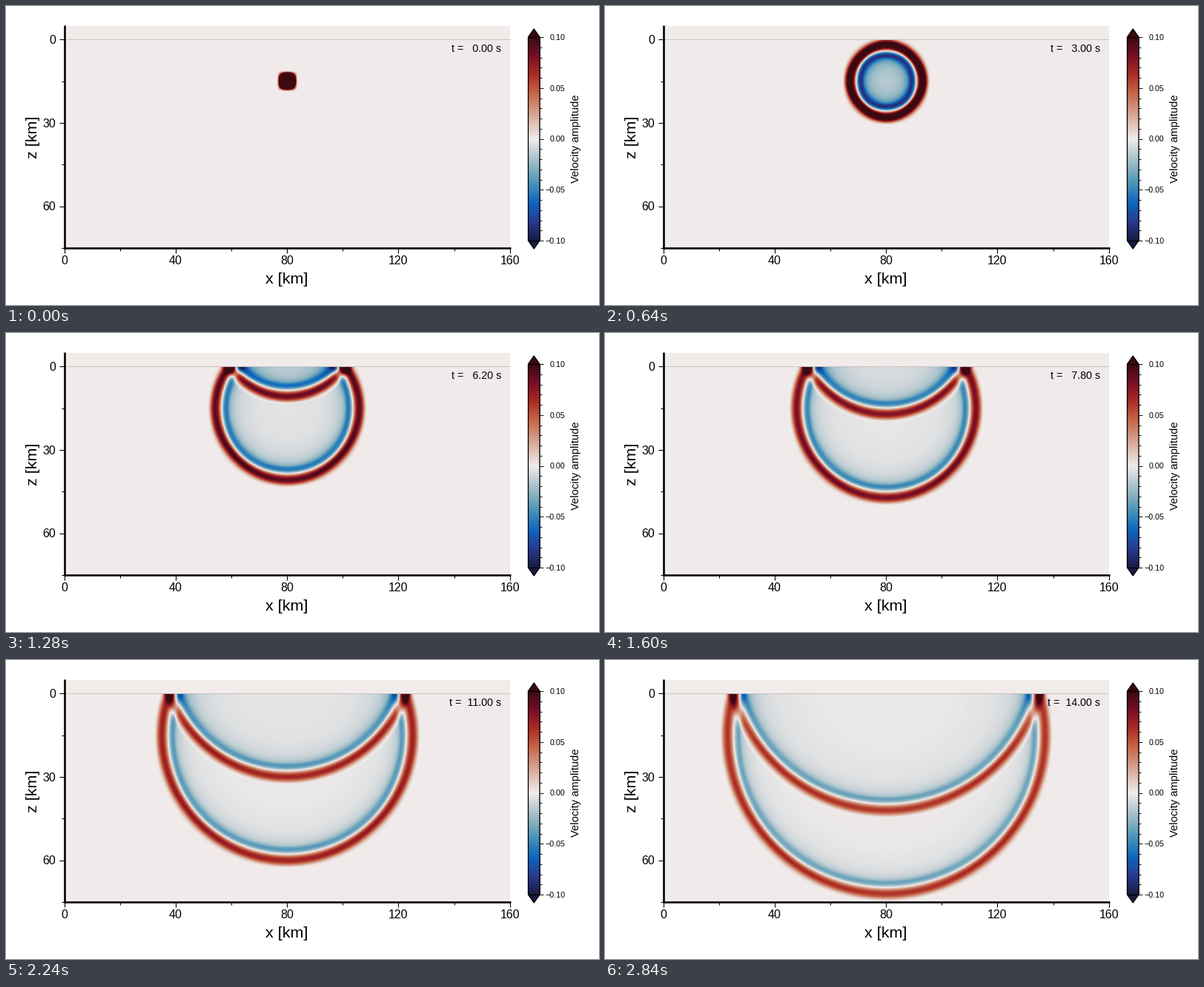
These frames come from a looping animation (800 px wide and 404 px high, 2.88 s). A matplotlib script:

```python
import numpy as np
import matplotlib.pyplot as plt
from matplotlib.animation import FuncAnimation
from matplotlib.colors import LinearSegmentedColormap

W, H, DPI = 800, 404, 100
FRAMES, INTERVAL = 72, 40
plt.rcParams["font.family"] = "Liberation Sans"

# Diverging blue-white-red scale
stops = [(23, 28, 66), (41, 58, 143), (11, 102, 189), (69, 144, 185),
         (142, 181, 194), (210, 216, 219), (241, 236, 235),
         (230, 210, 204), (213, 157, 137), (196, 101, 72),
         (172, 43, 36), (120, 14, 40), (60, 9, 17)]
places = [k / 11 for k in range(6)] + [0.5] + [k / 11 for k in range(6, 12)]
cmap = LinearSegmentedColormap.from_list(
    "wave", [(p, np.array(c) / 255) for p, c in zip(places, stops)], N=512)
VMAX = 0.1

# Map from km to stage pixels
X0, Z0, KM = 78.7, 45.4, 3.756
LEFT, RIGHT = X0, X0 + 160 * KM
TOP, BOTTOM = Z0 - 5 * KM, Z0 + 75 * KM

# Wave field: the free surface is a mirror at z = 0
SPEED, RADIUS, DEPTH = 4.0, 3.8, 15.0
SIZE, STEP = 160.0, 0.25
N = int(SIZE / STEP)
axis = (np.arange(N) + 0.5) * STEP - SIZE / 2


def bump(d):
    return np.where(abs(d) < RADIUS, 0.5 + 0.5 * np.cos(np.pi * d / RADIUS), 0)


start = np.outer(bump(axis - DEPTH) + bump(axis + DEPTH), bump(axis))
spectrum = np.fft.rfft2(start)
kz = 2 * np.pi * np.fft.fftfreq(N, STEP)[:, None]
kx = 2 * np.pi * np.fft.rfftfreq(N, STEP)[None, :]
omega = SPEED * np.hypot(kx, kz)
rows = slice(N // 2, N // 2 + int(75 / STEP))


def field(t):
    return np.fft.irfft2(spectrum * np.cos(omega * t), s=(N, N))[rows]


fig = plt.figure(figsize=(W / DPI, H / DPI), dpi=DPI, facecolor="white")
ax = fig.add_axes([0, 0, 1, 1])
ax.axis("off")


def px(size):
    return size * 72 / DPI


def line(xs, ys, width, color="black", z=4, **kw):
    ax.plot(xs, ys, color=color, lw=px(width), zorder=z,
            solid_capstyle="butt", **kw)


def label(x, y, s, size, ha="center", **kw):
    """Text whose digits are centred on y."""
    return ax.text(x, y + 0.355 * size, s, fontsize=px(size), ha=ha,
                   va="baseline", zorder=5, **kw)


# Plot area
ax.fill([LEFT, RIGHT, RIGHT, LEFT], [TOP, TOP, BOTTOM, BOTTOM],
        color=cmap(0.5), lw=0, zorder=1)
wave = ax.imshow(field(0), cmap=cmap, vmin=-VMAX, vmax=VMAX, zorder=2,
                 extent=[LEFT, RIGHT, BOTTOM, Z0], interpolation="bilinear",
                 aspect="auto")
line([LEFT, RIGHT], [Z0, Z0], 0.9, "#c4c0c0", 3)
line([LEFT, LEFT], [TOP - 1, BOTTOM + 1.2], 2.6)
line([LEFT - 1.2, RIGHT + 1], [BOTTOM, BOTTOM], 2.6)

for km in range(0, 161, 20):
    x, major = X0 + km * KM, km % 40 == 0
    line([x, x], [BOTTOM, BOTTOM + (6.5 if major else 3.5)], 1.1)
    if major:
        label(x, 343.8, str(km), 16)
for km in range(0, 76, 15):
    y, major = Z0 + km * KM, km % 30 == 0
    line([LEFT - (6.5 if major else 3.5), LEFT], [y, y], 1.1)
    if major:
        label(67.5, y, str(km), 16, "right")

label(379, 367, "x [km]", 21.5)
ax.text(42, 177, "z [km]", fontsize=px(21.5), rotation=90, ha="right",
        va="center", rotation_mode="default").set(
            rotation_mode="anchor", ha="center", va="baseline")
clock = label(668, 56.6, "", 14.2, "right")

# Colour bar
BL, BR, BT, BB, TIP = 704.5, 720, 42, 317, 11
mid = (BL + BR) / 2
ax.imshow(np.linspace(1, 0, 512)[:, None], cmap=cmap, vmin=0, vmax=1,
          extent=[BL, BR, BB, BT], aspect="auto", zorder=2)
ax.fill([BL, mid, BR], [BT, BT - TIP, BT], color=cmap(1.0), lw=0, zorder=2)
ax.fill([BL, mid, BR], [BB, BB + TIP, BB], color=cmap(0.0), lw=0, zorder=2)
line([BL, mid, BR, BR, mid, BL, BL],
     [BT, BT - TIP, BT, BB, BB + TIP, BB, BT], 1.3)
line([BL, BR], [BT, BT], 1.3)
line([BL, BR], [BB, BB], 1.3)
for k in range(-10, 11):
    y, major = (BT + BB) / 2 - k * (BB - BT) / 20, k % 5 == 0
    line([BR, BR + (5 if major else 3)], [y, y], 0.9)
    if major:
        label(754.3, y, f"{k / 100:.2f}".replace("-", "\u2212"), 10.7, "right")
ax.text(772.5, 179.5, "Velocity amplitude", fontsize=px(14.8), rotation=90,
        rotation_mode="anchor", ha="center", va="baseline")

ax.set(xlim=(0, W), ylim=(H, 0))


def draw(i):
    t = 0.2 * max(i - 1, 0)
    wave.set_data(field(t))
    clock.set_text(f"t = {t:6.2f} s")
    return wave, clock


anim = FuncAnimation(fig, draw, frames=FRAMES, interval=INTERVAL,
                     init_func=lambda: draw(0), repeat=True, repeat_delay=0)
plt.show()
```
